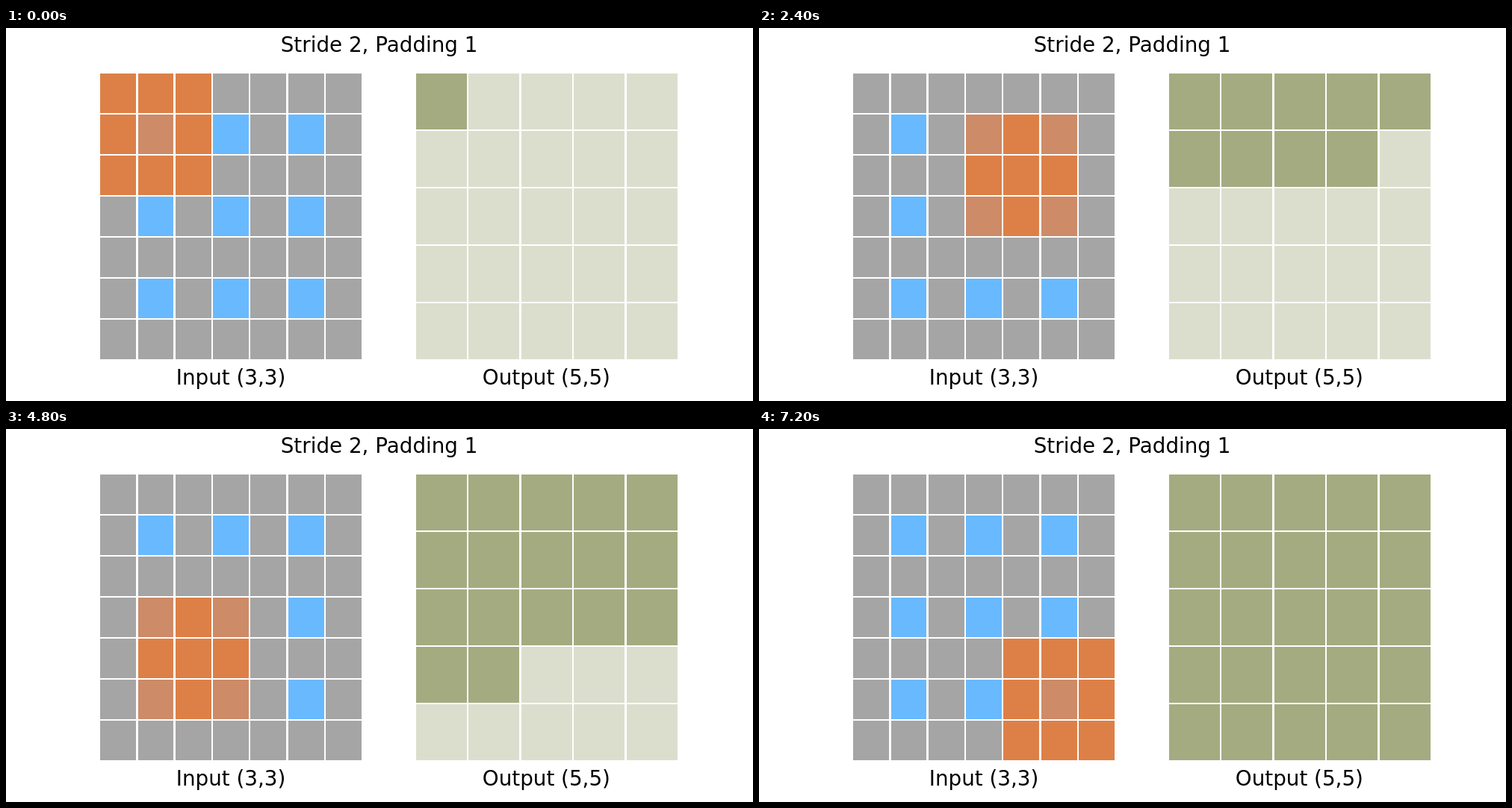
These frames come from a looping animation (1000 px wide and 500 px high, 7500 ms). An HTML page:

```html
<!DOCTYPE html>
<html lang="en">
<head>
<meta charset="utf-8">
<title>Strided convolution</title>
<style>
  html, body { margin: 0; width: 100%; height: 100%; overflow: hidden; background: #fff; }
  svg { display: block; width: 100%; height: 100%; }
  text { font: 27.78px "DejaVu Sans", sans-serif; text-anchor: middle; }
</style>
</head>
<body>
<svg viewBox="0 0 1000 500">
  <g id="cells" shape-rendering="crispEdges"></g>
  <text x="499.6" y="32">Stride 2, Padding 1</text>
  <text x="301.1" y="478">Input (3,3)</text>
  <text x="723.4" y="478">Output (5,5)</text>
</svg>
<script>
const STEP_MS = 300;
const INPUT_SIZE = 7, OUTPUT_SIZE = 5, KERNEL_SIZE = 3;
const TOP = 60, WIDTH = 352.27, HEIGHT = 385;
const HALF_LINE = 0.694;
const COLORS = {
  zero: '#a5a5a5', value: '#69b9ff',
  kernelZero: '#dd8047', kernelValue: '#cd8b68',
  pending: '#dbdecd', done: '#a4ab81'
};

// Grid lines cover every pixel they touch, so cells span whole pixels between them.
function cellSpan(origin, size, index) {
  const start = Math.ceil(origin + size * index + HALF_LINE);
  const end = Math.floor(origin + size * (index + 1) - HALF_LINE);
  return [start, end - start];
}

function makeGrid(left, size) {
  return Array.from({ length: size * size }, (_, i) => {
    const col = i % size, row = Math.floor(i / size);
    const [x, width] = cellSpan(left, WIDTH / size, col);
    const [y, height] = cellSpan(TOP, HEIGHT / size, row);
    const rect = document.createElementNS('http://www.w3.org/2000/svg', 'rect');
    Object.entries({ x, y, width, height }).forEach(([k, v]) => rect.setAttribute(k, v));
    document.getElementById('cells').append(rect);
    return { rect, col, row };
  });
}

const input = makeGrid(125, INPUT_SIZE);
const output = makeGrid(547.73, OUTPUT_SIZE);

function draw(step) {
  const kernelCol = step % OUTPUT_SIZE, kernelRow = Math.floor(step / OUTPUT_SIZE);
  const covers = (start, n) => n >= start && n < start + KERNEL_SIZE;

  for (const { rect, col, row } of input) {
    const hasValue = col % 2 && row % 2;
    const inKernel = covers(kernelCol, col) && covers(kernelRow, row);
    rect.setAttribute('fill', inKernel
      ? (hasValue ? COLORS.kernelValue : COLORS.kernelZero)
      : (hasValue ? COLORS.value : COLORS.zero));
  }
  output.forEach(({ rect }, i) =>
    rect.setAttribute('fill', i <= step ? COLORS.done : COLORS.pending));
}

let shownStep = -1;
function tick() {
  const step = Math.floor(performance.now() / STEP_MS) % output.length;
  if (step !== shownStep) draw(shownStep = step);
  requestAnimationFrame(tick);
}
tick();
</script>
</body>
</html>
```
